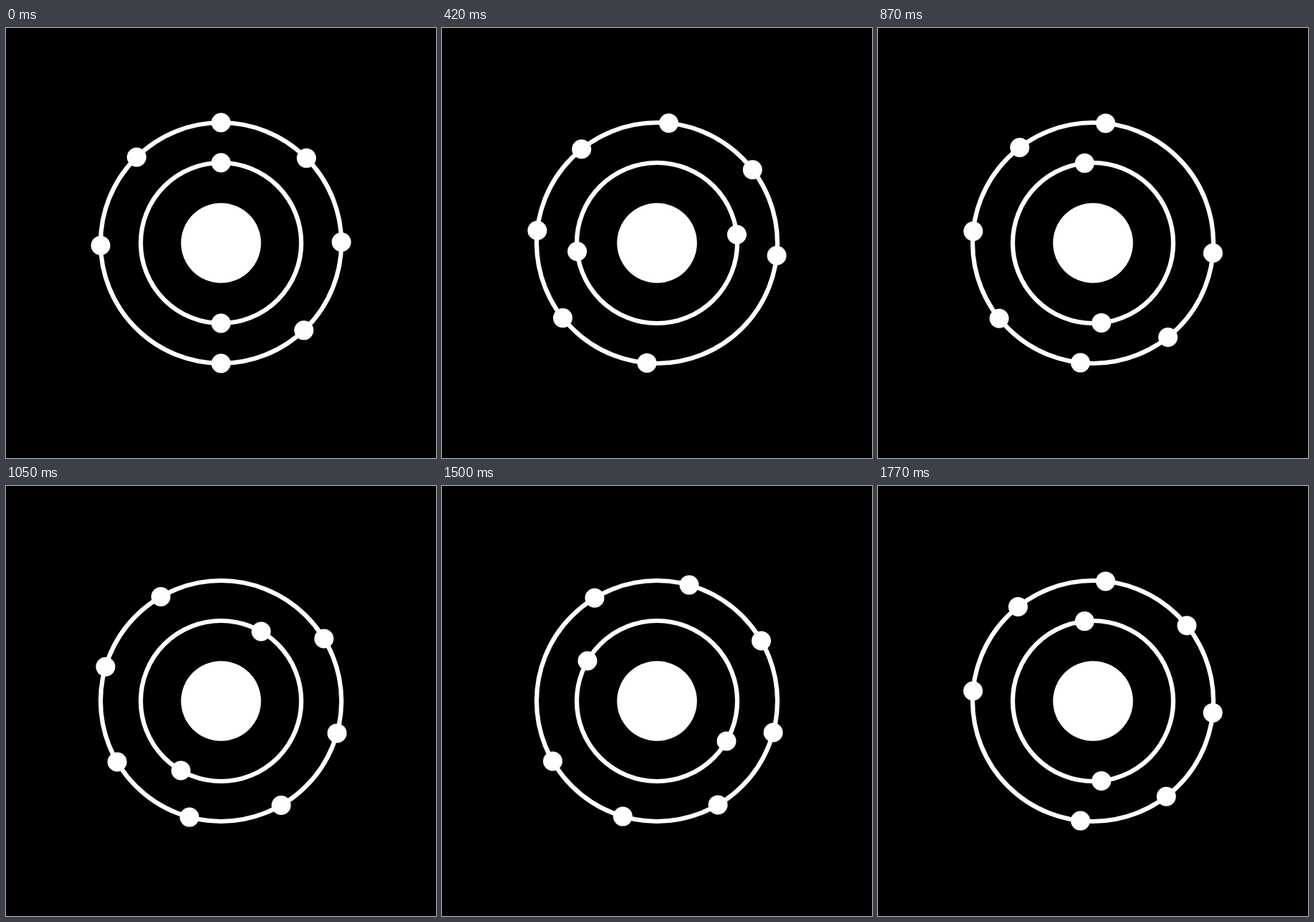
Write an HTML page with a canvas that moves like this. It is 600x600 px and loops after 1.8 s.

```html
<!DOCTYPE html>
<html lang="en">
<head>
<meta charset="utf-8">
<title>Atom</title>
<style>
html, body { margin: 0; width: 100%; height: 100%; overflow: hidden; background: #000; }
canvas { display: block; width: 600px; height: 600px; }
</style>
</head>
<body>
<canvas id="stage" width="600" height="600"></canvas>
<script>
const ctx = document.getElementById('stage').getContext('2d');
const LOOP = 1800, STEP = 30, CENTER = 300;

// Electron angles in degrees, clockwise from the top; turn is the direction.
const shells = [
  { radius: 112, turn: 1, electrons: [0, 180] },
  { radius: 168, turn: -1, electrons: [0, 45.2, 89.6, 136.5, 180, 268.8, 315.5] }
];

function disc(x, y, r) {
  ctx.beginPath();
  ctx.arc(x, y, r, 0, Math.PI * 2);
  ctx.fill();
}

function drawShell({ radius, turn, electrons }, spin) {
  ctx.beginPath();
  ctx.arc(CENTER, CENTER, radius, 0, Math.PI * 2);
  ctx.stroke();
  for (const start of electrons) {
    const a = (start + turn * spin) * Math.PI / 180;
    disc(CENTER + radius * Math.sin(a), CENTER - radius * Math.cos(a), 13.5);
  }
}

function draw(time) {
  const step = Math.floor((time % LOOP + 0.01) / STEP);
  const spin = 360 * step * STEP / LOOP;
  ctx.fillStyle = '#000';
  ctx.fillRect(0, 0, 600, 600);
  ctx.fillStyle = ctx.strokeStyle = '#fff';
  ctx.lineWidth = 6.2;
  disc(CENTER, CENTER, 55.8);
  for (const shell of shells) drawShell(shell, spin);
}

function tick(now) {
  draw(now);
  requestAnimationFrame(tick);
}

draw(0);
requestAnimationFrame(tick);
</script>
</body>
</html>
```
